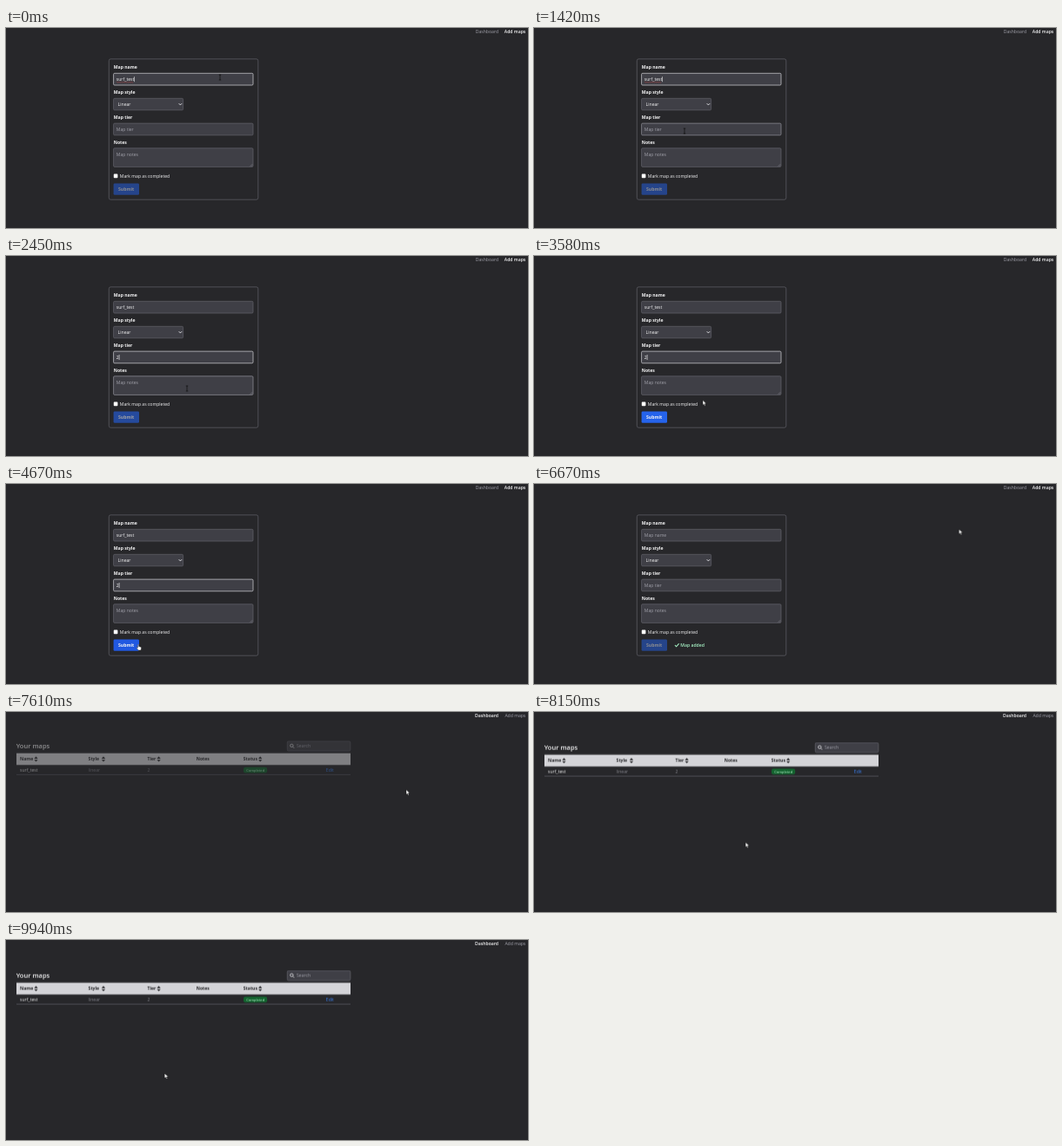
Write an HTML page that moves like this. It is 600 by 231 pixels and loops after 10 s.

```html
<!DOCTYPE html>
<html lang="en">
<head>
<meta charset="utf-8">
<title>Add a map</title>
<style>
html, body { margin: 0; width: 100%; height: 100%; overflow: hidden; background: #27272a; }
svg { display: block; width: 600px; height: 231px; font: 5.1px "Open Sans", "Noto Sans", sans-serif; fill: #f4f4f5; }
.bold { font-weight: 700; }
.semi { font-weight: 600; }
.dim { fill: #a1a1aa; }
.faint { fill: #85858d; }
.end { text-anchor: end; }
.line { fill: none; stroke: #63636b; stroke-width: .7; }
.field { fill: #3f3f46; stroke: #63636b; stroke-width: .7; }
.caret { stroke: #fff; stroke-width: .6; }
.head text { fill: #27272a; font-weight: 700; }

/* Every track shares one 10 s clock: 1% = 100 ms. */
[class*="t-"] { animation: 10s step-end infinite; }
.t-form { animation-name: form; animation-timing-function: linear; }
.t-board { animation-name: board; animation-timing-function: linear; }
.t-add { animation-name: before-nav; }
.t-dash { animation-name: after-nav; }
.t-filled { animation-name: filled; }
.t-cleared { animation-name: cleared; }
.t-tier { animation-name: tier; }
.t-tier-empty { animation-name: tier-empty; }
.t-name-box { animation-name: name-box; }
.t-tier-box { animation-name: tier-box; }
.t-note-box { animation-name: note-box; }
.t-spell { animation-name: spell; }
.t-caret1 { animation-name: caret1; }
.t-caret2 { animation-name: caret2; }
.t-check { animation-name: check; }
.t-submit { animation-name: submit; animation-timing-function: linear; }
.t-hover { animation-name: hover; animation-timing-function: linear; }
.t-move { animation-name: move; animation-timing-function: linear; }
.t-beam { animation-name: beam; }
.t-arrow { animation-name: arrow; }
.t-hand { animation-name: hand; }

@keyframes form { 0%, 73.9% { opacity: 1 } 75.2%, 99.99% { opacity: 0 } 100% { opacity: 1 } }
@keyframes board {
  0% { opacity: 0; transform: translateY(-3.6px) }
  75.3% { opacity: 0; transform: translateY(-3.6px); animation-timing-function: cubic-bezier(.215, .61, .355, 1) }
  79.3%, 100% { opacity: 1; transform: none }
}
@keyframes before-nav { 0% { opacity: 1 } 74% { opacity: 0 } }
@keyframes after-nav { 0% { opacity: 0 } 74% { opacity: 1 } }
@keyframes filled { 0% { opacity: 1 } 58% { opacity: 0 } }
@keyframes cleared { 0% { opacity: 0 } 58% { opacity: 1 } }
@keyframes tier { 0% { opacity: 0 } 22.4% { opacity: 1 } 58% { opacity: 0 } }
@keyframes tier-empty { 0% { opacity: 1 } 22.4% { opacity: 0 } 58% { opacity: 1 } }
@keyframes name-box { 0% { stroke: #d4d4d8 } 15% { stroke: #63636b } }
@keyframes tier-box { 0% { stroke: #63636b } 8.6% { stroke: #92929b } 15% { stroke: #d4d4d8 } 50.5% { stroke: #63636b } }
@keyframes note-box { 0% { stroke: #63636b } 19.8% { stroke: #92929b } 31.5% { stroke: #63636b } }
@keyframes spell { 0% { opacity: 1 } 15% { opacity: 0 } }
@keyframes caret1 { 0% { opacity: 1 } 4% { opacity: 0 } 9.3% { opacity: 1 } 15% { opacity: 0 } }
@keyframes caret2 {
  0% { opacity: 0 } 22.4% { opacity: 1 } 26.6% { opacity: 0 } 31.9% { opacity: 1 }
  37% { opacity: 0 } 42% { opacity: 1 } 47.2% { opacity: 0 }
}
@keyframes check { 0% { opacity: 0 } 51.8% { opacity: 1 } 58% { opacity: 0 } }
@keyframes submit {
  0%, 22.3% { opacity: .5 } 22.7%, 24.5% { opacity: .6 } 26%, 57.9% { opacity: 1 } 59.4%, 100% { opacity: .5 }
}
@keyframes hover {
  0%, 46.1% { fill: #2563eb } 47.3%, 49% { fill: #1d4ed8 } 50.5%, 53.5% { fill: #2563eb }
  55%, 58% { fill: #1d4ed8 } 59.5%, 100% { fill: #2563eb }
}
@keyframes move {
  0%, 3.9% { transform: translate(246px, 57px) }
  7% { transform: translate(205px, 100px) }
  10% { transform: translate(172px, 124px) }
  13.9%, 18.5% { transform: translate(173px, 119px) }
  20.9%, 24.5% { transform: translate(208px, 153px) }
  27.3%, 29.7% { transform: translate(211px, 155px) }
  32% { transform: translate(205px, 162px) }
  35.8% { transform: translate(194px, 166.5px) }
  39.7%, 40.3% { transform: translate(183px, 184px) }
  43%, 46.1% { transform: translate(154px, 184px) }
  47.3%, 48.8% { transform: translate(150px, 186px) }
  51%, 52.3% { transform: translate(127px, 171px) }
  55.5%, 59% { transform: translate(149px, 185.5px) }
  63% { transform: translate(330px, 125px) }
  66.7% { transform: translate(488px, 52.5px) }
  67.9% { transform: translate(545px, 17px) }
  72.4%, 74% { transform: translate(549px, 6px) }
  76.1% { transform: translate(460.5px, 89.5px) }
  79% { transform: translate(300px, 142px) }
  82.4%, 85.2% { transform: translate(223px, 153.5px) }
  88.8%, 90.3% { transform: translate(187.5px, 153.5px) }
  91.2%, 97.3% { transform: translate(184px, 153.5px) }
  99.4%, 99.99% { transform: translate(182.3px, 154px) }
  100% { transform: translate(246px, 57px) }
}
@keyframes beam { 0% { opacity: 1 } 4.6% { opacity: 0 } 8.6% { opacity: 1 } 19.2% { opacity: 0 } 19.8% { opacity: 1 } 31.5% { opacity: 0 } }
@keyframes arrow {
  0% { opacity: 0 } 4.6% { opacity: 1 } 8.6% { opacity: 0 } 19.2% { opacity: 1 } 19.8% { opacity: 0 } 31.5% { opacity: 1 }
  46.5% { opacity: 0 } 49.5% { opacity: 1 } 54.5% { opacity: 0 } 59.4% { opacity: 1 } 71% { opacity: 0 } 74.3% { opacity: 1 }
}
@keyframes hand { 0% { opacity: 0 } 46.5% { opacity: 1 } 49.5% { opacity: 0 } 54.5% { opacity: 1 } 59.4% { opacity: 0 } 71% { opacity: 1 } 74.3% { opacity: 0 } }
</style>
</head>
<body>
<svg viewBox="0 0 600 231">
  <defs>
    <path id="sort" d="M-2.2-.6L0-3 2.2-.6zM-2.2.6L0 3 2.2.6z" fill="#27272a"/>
  </defs>

  <g class="end">
    <g class="t-add">
      <text class="dim" x="566" y="5.6">Dashboard</text>
      <text class="semi" x="597.3" y="5.6">Add maps</text>
    </g>
    <g class="t-dash">
      <text class="semi" x="566" y="5.6">Dashboard</text>
      <text class="dim" x="597.3" y="5.6">Add maps</text>
    </g>
  </g>

  <g class="t-form">
    <rect class="line" x="118.3" y="35.8" width="171.5" height="162.4" rx="2"/>
    <g class="bold">
      <text x="123.8" y="47.2">Map name</text>
      <text x="123.8" y="76">Map style</text>
      <text x="123.8" y="104.8">Map tier</text>
      <text x="123.8" y="133.6">Notes</text>
    </g>

    <rect class="field t-name-box" x="123.6" y="52.3" width="160.4" height="13.7" rx="1.2"/>
    <g class="t-filled">
      <text x="126.8" y="61">surf_test</text>
    </g>
    <path class="t-spell" d="M127 62.7q.6-1 1.2 0t1.2 0 1.2 0 1.2 0 1.2 0 1.2 0 1.2 0 1.2 0 1.2 0 1.2 0 1.2 0 1.2 0 1.2 0 1.2 0 1.2 0 1.2 0" fill="none" stroke="#b9403f" stroke-width=".5"/>
    <path class="caret t-caret1" d="M147.6 56.2v6"/>
    <text class="dim t-cleared" x="126.8" y="61">Map name</text>

    <rect class="field" x="123.6" y="81.3" width="80" height="13.5" rx="1.2"/>
    <text x="128.6" y="89.9">Linear</text>
    <path d="M198.7 87.2l1.7 1.7 1.7-1.7" fill="none" stroke="#f4f4f5" stroke-width=".9"/>

    <rect class="field t-tier-box" x="123.6" y="110.1" width="160.4" height="13.7" rx="1.2"/>
    <text class="dim t-tier-empty" x="126.8" y="118.8">Map tier</text>
    <text class="t-tier" x="126.8" y="118.8">2</text>
    <path class="caret t-caret2" d="M130.1 114v6"/>

    <rect class="field t-note-box" x="123.6" y="138.8" width="160.4" height="21.6" rx="1.2"/>
    <text class="dim" x="126.8" y="147.6">Map notes</text>
    <path d="M283.2 157.2l-2.6 2.6m2.6-1.1l-1.1 1.1" stroke="#a1a1aa" stroke-width=".4"/>

    <rect x="123.8" y="168.6" width="4.6" height="4.6" rx=".8" fill="#fff"/>
    <g class="t-check">
      <rect x="123.8" y="168.6" width="4.6" height="4.6" rx=".8" fill="#2b7de9"/>
      <path d="M124.8 170.9l1 1 1.7-2" fill="none" stroke="#fff" stroke-width=".8"/>
    </g>
    <text x="130.8" y="172.8">Mark map as completed</text>

    <g class="t-submit">
      <rect class="t-hover" x="123.6" y="179.4" width="29.4" height="13.4" rx="1.4" fill="#2563eb"/>
      <text class="bold" x="129" y="188">Submit</text>
    </g>
    <g class="t-cleared">
      <path d="M162 186.1l1.6 1.7 3-3.5" fill="none" stroke="#a7f3c5" stroke-width="1.1"/>
      <text class="semi" x="168.3" y="188" fill="#a7f3c5">Map added</text>
    </g>
  </g>

  <g class="t-board">
    <text class="semi" x="11.8" y="44" font-size="7.5">Your maps</text>
    <rect class="field" x="323.3" y="35.4" width="72.6" height="11.3" rx="1.4"/>
    <g fill="none" stroke="#d4d4d8" stroke-width=".9">
      <circle cx="328.4" cy="40.5" r="1.7"/>
      <path d="M329.6 41.8l1.7 1.7"/>
    </g>
    <text class="dim" x="334" y="42.8">Search</text>

    <rect x="12" y="49.3" width="384" height="13.6" fill="#d4d4d8"/>
    <g class="head">
      <text x="16" y="58">Name</text>
      <text x="94.6" y="58">Style</text>
      <text x="162.6" y="58">Tier</text>
      <text x="218.8" y="58">Notes</text>
      <text x="272.8" y="58">Status</text>
      <use href="#sort" x="34.5" y="56.2"/>
      <use href="#sort" x="112" y="56.2"/>
      <use href="#sort" x="175.6" y="56.2"/>
      <use href="#sort" x="292.2" y="56.2"/>
    </g>
    <text x="16" y="70.3">surf_test</text>
    <text class="faint" x="94.6" y="70.3">linear</text>
    <text class="faint" x="162.6" y="70.3">2</text>
    <rect x="273" y="65.4" width="27.2" height="6.6" rx="2.2" fill="#14632f"/>
    <text x="276.2" y="70.2" font-size="4.1" fill="#bbf7d0">Completed</text>
    <text x="367.8" y="70.3" fill="#3b82f6">Edit</text>
    <path class="line" d="M12 74h384"/>
  </g>

  <g class="t-move">
    <path class="t-beam" d="M-1.2-3h2.4M0-3v6M-1.2 3h2.4" fill="none" stroke="#0c0c0e" stroke-width=".7"/>
    <path class="t-arrow" d="M0 0v5.6l1.3-1.2 1 2.2 1-.5-1-2.1h1.8z" fill="#fff" stroke="#000" stroke-width=".4"/>
    <path class="t-hand" d="M-.6.6Q0-.4.6.6v2l2.4.6q.8.3.6 1.2l-.5 2.6h-3.1l-2-2.8q.1-.9 1.4 0z" fill="#fff" stroke="#000" stroke-width=".4"/>
  </g>
</svg>
</body>
</html>
```
